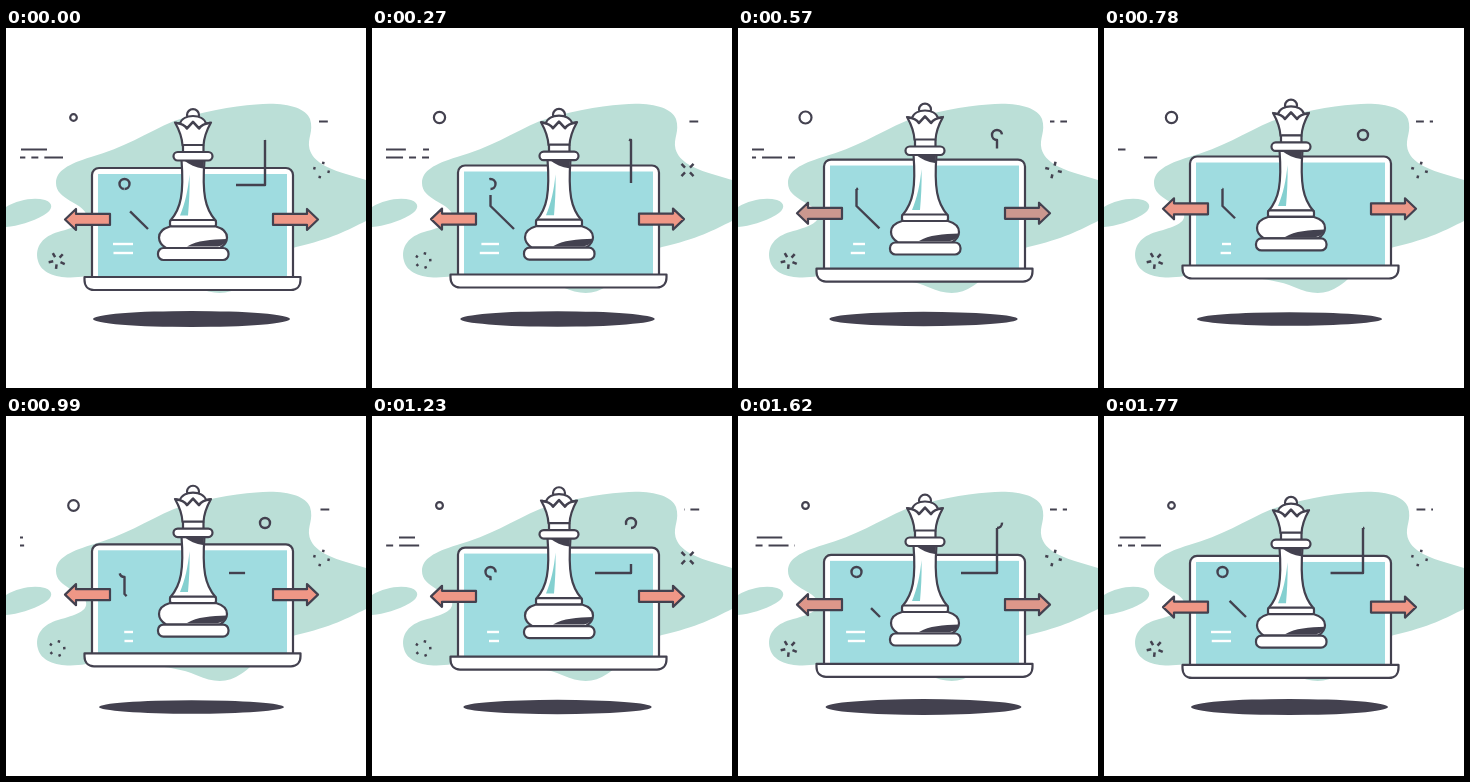
An HTML page with a canvas that plays this animation: 360x360 px, repeating every 1800 ms.

```html
<!DOCTYPE html>
<html>
<head>
<meta charset="utf-8">
<style>
html, body { margin: 0; width: 100%; height: 100%; overflow: hidden; background: #fff; }
canvas { display: block; }
</style>
</head>
<body>
<canvas id="stage" width="360" height="360"></canvas>
<script>
const ctx = document.getElementById('stage').getContext('2d');
const LOOP = 1800;
const INK = '#43414f', MINT = '#bbdfd7', TEAL = '#9fdce0', SHINE = '#84d0d0', WHITE = '#fff';

// Smooth wave from 0 (at time `low`) up to 1 half a loop later
const wave = (t, low) => (1 - Math.cos((t - low) / LOOP * 2 * Math.PI)) / 2;

// Linear interpolation through [time, value, time, value, ...]
function track(t, k) {
  if (t <= k[0]) return k[1];
  for (let i = 2; i < k.length; i += 2) {
    if (t <= k[i]) return k[i - 1] + (k[i + 1] - k[i - 1]) * (t - k[i - 2]) / (k[i] - k[i - 2]);
  }
  return k[k.length - 1];
}

function shape(d, fill, stroke, width = 2.2) {
  const p = d instanceof Path2D ? d : new Path2D(d);
  if (fill) { ctx.fillStyle = fill; ctx.fill(p); }
  if (stroke) { ctx.strokeStyle = stroke; ctx.lineWidth = width; ctx.stroke(p); }
}

function box(x, y, w, h, r, fill, stroke) {
  const p = new Path2D();
  p.roundRect(x, y, w, h, r);
  shape(p, fill, stroke);
}

function disc(x, y, rx, ry, fill, stroke) {
  const p = new Path2D();
  p.ellipse(x, y, rx, ry, 0, 0, 2 * Math.PI);
  shape(p, fill, stroke);
}

function line(x1, y1, x2, y2, color = INK, width = 2) {
  shape(`M${x1} ${y1}L${x2} ${y2}`, null, color, width);
}

// Horizontal line cut to the window lo..hi
function dash(a, b, y, lo, hi) {
  a = Math.max(a, lo);
  b = Math.min(b, hi);
  if (b > a) line(a, y, b, y);
}

function shifted(dy, draw) {
  ctx.save();
  ctx.translate(0, dy);
  draw();
  ctx.restore();
}

// A stroke that runs along a line and curls into a ring
function runner(t, d, head, tail) {
  for (let k = 0; k < 3; k++) {
    const from = track(t + k * LOOP, tail), to = track(t + k * LOOP, head);
    if (to - from < 0.1) continue;
    ctx.setLineDash([to - from, 999]);
    ctx.lineDashOffset = -from;
    shape(d, null, INK, 2.4);
    ctx.setLineDash([]);
  }
}

function burst(x, y, count, turn, outer, length) {
  for (let i = 0; i < count; i++) {
    const a = turn * Math.PI / 180 + i * 2 * Math.PI / count;
    const c = Math.cos(a), s = Math.sin(a), inner = outer - length;
    line(x + c * inner, y + s * inner, x + c * outer, y + s * outer, INK, 2.5);
  }
}

function background() {
  shape('M50 155C50 143 62 136 85 129C118 120 140 105 168 93C195 84 226 78 250 76.5C278 74 299 79 304 91' +
    'C308 104 301 110 303.5 121C307 134 323 141 340 146L360 152V193C342 202 325 211 290 219' +
    'C260 227 252 248 235 258C222 267 208 267 190 259C165 248 125 248 80 248C58 252 36 248 32 233' +
    'C28 218 38 208 52 204C70 199 82 195 80 186C76 174 50 172 50 155Z', MINT);
  shape('M0 179C12 172 27 169 39 172C48 175 47 182 38 187C26 194 12 198 0 199Z', MINT);
}

function laptop() {
  box(86, 140, 201, 116, 7, WHITE, INK);
  ctx.fillStyle = TEAL;
  ctx.fillRect(92, 146, 189, 103);
  shape('M78.5 249H294.5V252C294.5 258 291 262 285 262H88C82 262 78.5 258 78.5 252Z', WHITE, INK);
}

function screenMarks(t) {
  line(107 + 11.5 * wave(t, 0), 216, 127, 216, WHITE, 2.4);
  line(107 + 11.5 * wave(t, 120), 225, 127, 225, WHITE, 2.4);
  runner(t, 'M142 201L118.5 178V161A5 5 0 0 1 118.5 151A5 5 0 0 1 118.5 161',
    [1440, 0, 2160, 50, 2705, 50, 3150, 81.7],
    [2360, 0, 3080, 50, 3590, 50, 4230, 81.7]);
  runner(t, 'M223 157H259V112A5 5 0 0 1 259 102A5 5 0 0 1 259 112',
    [857, 0, 1532, 81, 2040, 81, 2510, 112.7],
    [1740, 0, 2445, 81, 2900, 81, 3630, 112.7]);
}

function arrow(color) {
  shape('M59 192L70 181.5V186.5H104V197.5H70V202.5Z', color, INK);
}

function arrows(t) {
  const dull = Math.max(0, -Math.cos((t - 120) / 450 * Math.PI));
  const mix = (a, b) => Math.round(a + (b - a) * dull);
  const color = `rgb(${mix(239, 203)},${mix(151, 152)},${mix(134, 143)})`;
  shifted(-13.4 * wave(t, 120), () => {
    arrow(color);
    ctx.translate(371, 0);
    ctx.scale(-1, 1);
    arrow(color);
  });
}

function queen() {
  // crown
  disc(187, 87.5, 6, 5.8, WHITE, INK);
  shape('M169 95L174 96C177 86 197 86 200 96L205 95C201 102 198 109 197.5 118H176.5C176 109 173 102 169 95Z', WHITE, INK);
  shape('M170 95.5C175 96 179 98 181 101L187 94.5L193 101C195 98 199 96 204 95.5', null, INK, 2.6);
  // neck and body
  box(177, 117.5, 20.5, 8, 1, WHITE, INK);
  shape('M175.5 132C178 166 175 181 164.5 193H209.5C199 181 196 166 198.5 132Z', WHITE, INK);
  shape('M183.5 147C184 162 183 176 182 188H174C179 176 182 163 183.5 147Z', SHINE);
  shape('M178 133H198L197 141C190 140 183 137 178 133Z', INK);
  box(167.5, 124.5, 39, 8.5, 4.2, WHITE, INK);
  // foot
  box(164, 192.5, 46, 6.5, 2, WHITE, INK);
  shape('M164 199H210C217 201 221 205 221 210C221 215 218 218 214 220.5H160C156 218 153 215 153 210C153 205 157 201 164 199Z', WHITE, INK);
  shape('M181 219C191 213 205 212 221 211.5C220 215 217 218 212 219Z', INK);
  box(152, 220.5, 70.5, 12, 5.5, WHITE, INK);
}

function leftDashes(t) {
  // upper line
  for (const T of [t, t + LOOP]) {
    const a = track(T, [1040, 35, 1230, 27, 1800, 15, 1850, 14]);
    const b = track(T, [1040, 35, 1230, 43, 1470, 47, 1800, 41, 2370, 26, 2790, 17, 2950, 14]);
    dash(a, b, 121.5, 14, 57);
  }
  const tip = track(t, [120, 57, 270, 51, 420, 57]);
  dash(tip, 57, 121.5, 14, 57);
  // lower line: a train of long and short dashes sliding right
  const T = t < 915 ? t + LOOP : t;
  const lo = track(T, [915, 14, 2400, 14, 2700, 57]);
  const front = track(T, [930, -6, 990, -2, 1230, 27, 1470, 63, 1800, 77.3, 2700, 116.3]);
  for (let x = front; x > -40; x -= 39) {
    dash(x, x + 20, 129.5, lo, 57);
    dash(x - 13, x - 6, 129.5, lo, 57);
  }
}

function ornaments(t) {
  const r = track(t, [0, 3.3, 270, 5.6, 570, 6, 990, 5.3, 1230, 3.4, 1800, 3.3]);
  disc(67.5, 89.5, r, r, null, INK);
  leftDashes(t);
  const slide = (t * 29.4 / LOOP) % 14.7;
  for (const x of [298.3, 313]) dash(x + slide, x + slide + 8.8, 93.5, 312, 329);

  const u = t % 900;
  burst(51, 232.5, 5, track(u, [0, -120, 80, -75, 380, -75, 540, -48]), 8.5,
    track(u, [0, 4.7, 80, 2.4, 380, 2.4, 540, 4.7]));
  burst(315.5, 142, 4, track(u, [90, 14, 270, 45, 330, 45, 570, 14]), 8.5,
    track(u, [90, 2.4, 270, 5, 330, 5, 570, 4, 860, 2.4]));
}

function render(t) {
  ctx.fillStyle = WHITE;
  ctx.fillRect(0, 0, 360, 360);
  const lift = wave(t, 0);
  background();
  ornaments(t);
  disc(185.5, 291, 98.5 - 6.2 * lift, 8 - 1.2 * lift, INK);
  shifted(-12 * lift, laptop);
  screenMarks(t);
  arrows(t);
  shifted(-12 * wave(t, 120), queen);
}

ctx.lineJoin = 'round';
const begin = performance.now();
function tick() {
  render((performance.now() - begin) % LOOP);
  requestAnimationFrame(tick);
}
tick();
</script>
</body>
</html>
```
